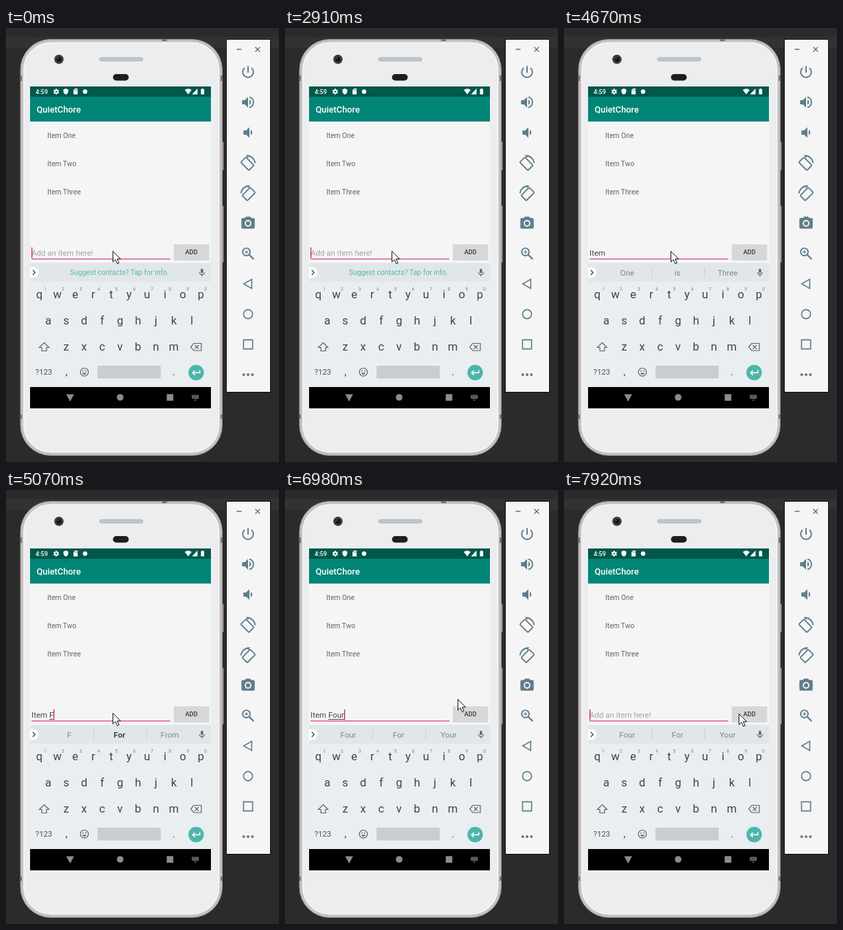
An HTML page for the animation above (8 s loop, 397 px wide and 631 px high).

```html
<!DOCTYPE html>
<html lang="en">
<head>
<meta charset="utf-8">
<title>Phone to-do list</title>
<style>
html, body { margin: 0; width: 100%; height: 100%; overflow: hidden; background: #2b2b2b; }
svg { display: block; width: 397px; height: 631px; font-family: Roboto, sans-serif; }
text { white-space: pre; }
</style>
</head>
<body>
<svg id="stage" viewBox="0 0 397 631" xmlns="http://www.w3.org/2000/svg"></svg>
<script>
const stage = document.getElementById('stage');
const LOOP = 8000;
const SLATE = '#607d8b', INK = '#37474f', PINK = '#d81b60';

const rect = (x, y, w, h, fill, more = '') =>
  `<rect x="${x}" y="${y}" width="${w}" height="${h}" fill="${fill}" ${more}/>`;
const circle = (x, y, r, fill, more = '') =>
  `<circle cx="${x}" cy="${y}" r="${r}" fill="${fill}" ${more}/>`;
const path = (d, fill, more = '') => `<path d="${d}" fill="${fill}" ${more}/>`;
const line = (d, color, width, more = '') =>
  path(d, 'none', `stroke="${color}" stroke-width="${width}" ${more}`);
const text = (x, y, size, fill, str, more = '') =>
  `<text x="${x}" y="${y}" font-size="${size}" fill="${fill}" ${more}>${str}</text>`;
const mid = 'text-anchor="middle"';
const at = (x, y, scale, body) =>
  `<g transform="translate(${x} ${y}) scale(${scale})">${body}</g>`;

function phone() {
  const mark = (x, y, w, h) => rect(x, y, w, h, '#6f696b');
  return rect(0, 13, 397, 16, '#323232') +
    rect(311, 165, 5, 42, '#d3d0d1', 'rx="1.5" stroke="#8d8587" stroke-width=".7"') +
    rect(311, 258, 5, 83, '#d3d0d1', 'rx="1.5" stroke="#8d8587" stroke-width=".7"') +
    rect(21, 16.5, 293.5, 605, '#cdc6c8', 'rx="44" stroke="#938a8c"') +
    rect(23, 18.5, 289.5, 601, 'none', 'rx="42" stroke="#bdb5b7"') +
    rect(26, 21.5, 283.5, 595, '#ebedef', 'rx="39" stroke="#f8f8f8" stroke-width="1.4"') +
    mark(227, 16.5, 7, 2.5) + mark(20.7, 69, 2.4, 8) + mark(312.3, 69, 2.4, 8) +
    mark(20.7, 562, 2.4, 6) + mark(312.3, 562, 2.4, 6) +
    rect(136, 43, 63, 5, '#c2c6c9', 'rx="2.5" stroke="#a8abad" stroke-width=".8"') +
    circle(77, 45.5, 6.8, '#3c3d3f') + circle(77, 45.5, 3.6, '#121314') +
    circle(75.6, 44, 1.1, '#5c6772') +
    rect(155.5, 67, 23, 9.5, '#1d1e20', 'rx="4.7"');
}

function statusBar() {
  let teeth = '';
  for (let a = 0; a < 360; a += 60) teeth += rect(-1, -4.4, 2, 3, '#fff', `transform="rotate(${a})"`);
  return rect(35, 85, 263, 15, '#00574b') +
    text(43, 96, 9.1, '#fff', '4:59', 'font-weight="500"') +
    at(73, 92.5, .95, teeth + circle(0, 0, 2.3, 'none', 'stroke="#fff" stroke-width="1.8"')) +
    path('M87 88l3.5 1.4v2.6q0 3.2-3.5 4.8q-3.5-1.6-3.5-4.8v-2.6z', '#fff') +
    path('M98.2 90.2l2.2-2.2h3.8v8.6h-6z', '#fff') +
    line('M100.6 89.2v2M102 89.2v2M103.3 89.2v2', '#00574b', .6) +
    circle(115, 92.5, 3.2, '#fff') +
    path('M260 90q5-3.6 10 0l-5 6.4z', '#fff') +
    path('M278.5 88v8.4h-8z', '#fff') +
    path('M283.5 89h1.2v-1h2.2v1h1.3v7.5h-4.7z', '#fff');
}

function app() {
  return rect(35, 85, 263, 468, '#f5f5f5') + rect(35, 100, 263, 36, '#008577') +
    text(44.5, 122.5, 12.8, '#fff', 'QuietChore', 'font-weight="500"') +
    statusBar() +
    ['One', 'Two', 'Three'].map((n, i) => text(60, 160 + 41 * i, 10.24, '#646464', 'Item ' + n)).join('') +
    rect(37, 335.2, 202, 1.3, PINK, 'opacity=".8"') +
    rect(244, 314.5, 51.5, 23.5, '#d6d7d7', 'rx="1.3"') +
    '<clipPath id="face"><rect x="244" y="314.5" width="51.5" height="23.5" rx="1.3"/></clipPath>' +
    '<circle id="ripple" cx="258" cy="326" r="0" fill="#000" fill-opacity=".13" clip-path="url(#face)"/>' +
    text(269.7, 329.3, 8.96, '#333', 'ADD', mid + ' font-weight="500"');
}

function keyboard() {
  const rows = [['qwertyuiop', 48.5, 393], ['asdfghjkl', 61.5, 431], ['zxcvbnm', 87.5, 469]];
  let s = rect(35, 341.5, 263, 180.5, '#e9eef0') + rect(35, 341.5, 263, 27.5, '#e1e6e9') +
    path('M35 347.5h4.5a8 8 0 0 1 0 16h-4.5z', '#fafbfb') +
    line('M39 352l3.3 3.5-3.3 3.5', '#3c474c', 1.3) +
    rect(283.2, 350, 3.6, 6.6, '#5b6a72', 'rx="1.8"') +
    line('M281.4 355q0 3.6 3.6 3.6t3.6-3.6M285 358.6v2.6', '#5b6a72', 1.1);
  for (const [keys, x, y] of rows)
    [...keys].forEach((k, i) => { s += text(x + 26.1 * i, y, 16.5, INK, k, mid + ' class="key"'); });
  [...'1234567890'].forEach((d, i) => { s += text(57 + 25.9 * i, 381.5, 6.4, '#76838a', d, mid); });
  return s +
    path('M55.5 457.5l7 7h-3.6v5h-6.8v-5h-3.6z', 'none', 'id="shift" stroke="#56646b" stroke-width="1.2"') +
    line('M273 458.5h11v10.5h-11l-4.3-5.2z', '#56646b', 1.2) +
    line('M274.6 461l5.6 5.6m0-5.6l-5.6 5.6', '#56646b', 1.2) +
    text(55, 504.2, 11.3, '#46555c', '?123', mid) +
    text(88, 504.5, 15, INK, ',', mid) + text(244, 504.5, 15, INK, '.', mid) +
    circle(114, 500.3, 5.8, 'none', 'stroke="#56646b" stroke-width="1.2"') +
    circle(112, 498.7, .9, '#56646b') + circle(116, 498.7, .9, '#56646b') +
    path('M110.8 501.6h6.4q-1 2.4-3.2 2.4t-3.2-2.4z', '#56646b') +
    rect(133, 491, 92, 18.5, '#c8cdd1', 'rx="1.5"') +
    circle(276.5, 501, 11.2, '#4db6ac') +
    line('M281.8 497.5v3.8h-10.3m3.2-3.3l-3.3 3.3 3.3 3.3', '#fff', 1.5) +
    rect(35, 522, 263, 31, '#000') +
    path('M87.5 532.5h11.5l-5.75 10.5z', '#8c8c8c') + circle(166, 537, 4.8, '#8c8c8c') +
    rect(233.7, 532.3, 9.6, 9.6, '#8c8c8c') + rect(270.3, 533.5, 10, 5.6, '#777', 'rx=".8"') +
    line('M271.3 535.2h8M271.3 537.2h8', '#000', .9, 'stroke-dasharray="1 .7"') +
    path('M273.3 540.3h4l-2 2z', '#777');
}

function toolPanel() {
  const st = (d, w = 2) => line(d, SLATE, w);
  const tilt = flip => `<g transform="scale(${flip} 1)">` +
    rect(-5.4, -8.6, 10.8, 17.2, 'none',
      `rx="1.2" stroke="${SLATE}" stroke-width="1.9" transform="translate(-1 1.5) rotate(-45)"`) +
    st('M-1.5-10.6a12 12 0 0 1 12 11', 1.9) +
    path('M-3.4-11.6h5.2l-2.2 4.4z', SLATE) + '</g>';
  const speaker = x => path(`M${x}-3v6h4l5 5v-16l-5 5z`, SLATE);
  const icons = [
    st('M0-9v10M-5.1-6.1a8 8 0 1 0 10.2 0'),
    speaker(-9) + path('M2-4v8a4.5 4.5 0 0 0 0-8z', SLATE) + st('M2-7.7a7.9 7.9 0 0 1 0 15.4'),
    speaker(-7) + path('M4-4v8a4.5 4.5 0 0 0 0-8z', SLATE),
    tilt(1), tilt(-1),
    path('M-3-10h6l1.8 2h3.2q2 0 2 2v12q0 2-2 2h-16q-2 0-2-2v-12q0-2 2-2h3.2z', SLATE) +
      circle(0, 0, 4.1, SLATE, 'stroke="#f5f5f5" stroke-width="1.9"'),
    circle(-2.5, -2.5, 5.6, 'none', `stroke="${SLATE}" stroke-width="2"`) +
      st('M1.8 1.8l6.6 6.6', 2.4) + st('M-5.2-2.5h5.4M-2.5-5.2v5.4', 1.2),
    st('M5.5-6.8v13.6l-12-6.8z', 1.7),
    circle(0, 0, 6.8, 'none', `stroke="${SLATE}" stroke-width="1.7"`),
    st('M-6.8-6.8h13.6v13.6h-13.6z', 1.7),
    [-6.5, 0, 6.5].map(x => circle(x, 0, 2.1, SLATE)).join('')
  ];
  return rect(320.5, 16.5, 64, 513, '#f5f5f5', 'stroke="#0c0c0c"') +
    line('M335.5 31h7M362.5 27.7l6.8 6.8m0-6.8l-6.8 6.8', '#607078', 1.3) +
    icons.map((icon, i) => at(352, 64 + 44 * i, .97, icon)).join('');
}

function entry() {
  let s = text(37, 331.2, 11.52, '#a3a3a3', 'Add an item here!', 'id="hint"') +
    text(37, 331.2, 11.52, '#484848', '', 'id="typed"') +
    rect(37, 333, 0, 1, '#484848', 'id="under"') +
    rect(37, 319, 1.3, 15.5, PINK, 'id="caret"') +
    text(165, 359.4, 10.4, '#55b8ae', 'Suggest contacts? Tap for info.', mid + ' id="tip"') +
    '<g id="words">' + line('M127.5 348v15M204.5 348v15', '#c9cfd3', 1);
  for (const x of [92, 165, 238]) s += text(x, 359.6, 11.52, '#7b878d', '', mid + ' class="word"');
  return s + '</g>';
}

const arrow = '<g id="mouse">' +
  path('M.5.5v15.6l3.6-3.4 2.7 6 2.5-1.1-2.6-5.8h4.9z', '#fff', 'stroke="#111" stroke-width="1"') + '</g>';

stage.innerHTML = phone() + app() + keyboard() + entry() + toolPanel() + arrow;

const $ = id => document.getElementById(id);
const [hint, typed, under, caret, tip, words, mouse, ripple, shift] =
  ['hint', 'typed', 'under', 'caret', 'tip', 'words', 'mouse', 'ripple', 'shift'].map($);
const wordEls = [...stage.querySelectorAll('.word')];
const keyEls = [...stage.querySelectorAll('.key')];

// Each track holds [start time, value] steps.
const typing = [[0, ''], [3350, 'I'], [3500, 'It'], [3770, 'Ite'], [3930, 'Item'], [4080, 'Item '],
  [4920, 'Item F'], [5220, 'Item Fo'], [5900, 'Item Four'], [7650, '']];
const guesses = [[0, ''], [3650, "It,It's,Its"], [3930, 'Item,Items,Iteration'], [4080, 'One,is,Three'],
  [5070, 'F,For,From'], [5220, 'Fo,For,Four'], [5900, 'Fou,Four,You'], [6050, 'Four,For,Your']];
const caretOn = [[0, 1], [560, 0], [960, 1], [1420, 0], [1950, 1], [2540, 0], [2910, 1], [4670, 0],
  [4920, 1], [5590, 0], [5900, 1], [6450, 0], [6980, 1], [7380, 0], [7650, 1]];
const pointer = [[0, [155, 324]], [6830, [225, 306]], [6980, [251, 304]], [7100, [251, 322]], [7250, [254, 325]]];
const press = [[0, 0], [7530, 14], [7650, 28], [7770, 45], [7920, 0]];
const caps = [[0, false], [4920, true], [5070, false]];

const step = (track, t) => track.reduce((v, [start, next]) => t >= start ? next : v, track[0][1]);
const set = (el, attrs) => { for (const k in attrs) el.setAttribute(k, attrs[k]); };
const show = (el, on) => set(el, { visibility: on ? 'visible' : 'hidden' });

function draw(t) {
  const str = step(typing, t);
  typed.textContent = str;
  show(hint, !str);
  const end = 37 + (str ? typed.getComputedTextLength() : 0);
  const from = str.lastIndexOf(' ') + 1;
  const live = from < str.length;
  show(under, live);
  if (live) {
    const x = 37 + (from ? typed.getSubStringLength(0, from) : 0);
    set(under, { x, width: end - x });
  }
  set(caret, { x: Math.round(end) });
  show(caret, step(caretOn, t));

  const list = step(guesses, t);
  show(tip, !list);
  show(words, list);
  list.split(',').forEach((w, i) => { wordEls[i].textContent = w; });
  const sure = list === 'F,For,From';
  set(wordEls[1], { 'font-weight': sure ? 700 : 400, fill: sure ? '#3b454a' : '#7b878d' });

  const upper = step(caps, t);
  for (const k of keyEls)
    k.textContent = upper ? k.textContent.toUpperCase() : k.textContent.toLowerCase();
  set(shift, { fill: upper ? '#56646b' : 'none' });

  set(ripple, { r: step(press, t) });
  set(mouse, { transform: `translate(${step(pointer, t)})` });
}

function tick() {
  draw(performance.now() % LOOP);
  requestAnimationFrame(tick);
}
tick();
</script>
</body>
</html>
```
